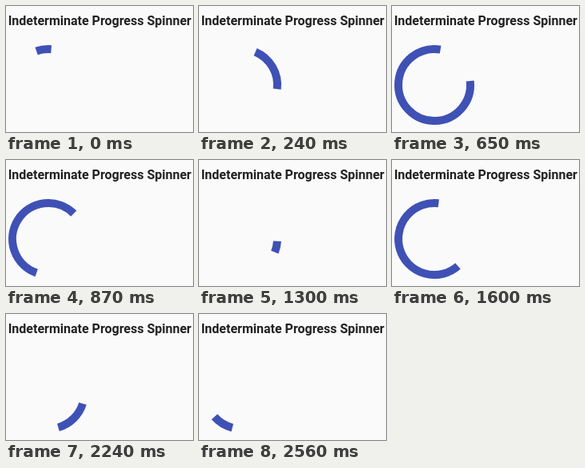
Animation, 234 px wide and 158 px high, one loop 2.58 s. Source, as an HTML page:

```html
<!DOCTYPE html>
<html lang="en">
<head>
<meta charset="utf-8">
<title>Indeterminate Progress Spinner</title>
<style>
  html, body { margin: 0; width: 100%; height: 100%; overflow: hidden; background: #fafafa; }
  svg { display: block; width: 234px; height: 158px; }
  text { font: 700 16px Roboto, sans-serif; fill: #212121; }
  path { fill: none; stroke: #3f51b5; stroke-width: 10; }
</style>
</head>
<body>
<svg viewBox="0 0 234 158">
  <text x="2.7" y="24">Indeterminate Progress Spinner</text>
  <path id="arc"/>
</svg>
<script>
  const LOOP = 2580, STEP = 20;
  const CYCLE = 1188;           // one grow and one shrink
  const FIRST = 107;            // start of the first grow
  const SPIN = 360 / (2 * CYCLE);
  const BASE = -13.4;
  const MIN = 18, MAX = 288;    // arc length in degrees
  const CX = 53, CY = 99, R = 45;
  const arc = document.getElementById('arc');

  // cubic-bezier(.35, 0, .25, 1)
  function ease(x) {
    let lo = 0, hi = 1;
    for (let i = 0; i < 24; i++) {
      const s = (lo + hi) / 2, q = 1 - s;
      const bx = 3 * q * q * s * 0.35 + 3 * q * s * s * 0.25 + s * s * s;
      if (bx < x) lo = s; else hi = s;
    }
    return lo * lo * (3 - 2 * lo);
  }

  function point(deg) {
    const a = deg * Math.PI / 180;
    return (CX + R * Math.sin(a)).toFixed(3) + ' ' + (CY - R * Math.cos(a)).toFixed(3);
  }

  function draw(t) {
    const pos = (t - FIRST) / CYCLE;
    const n = Math.floor(pos);
    const half = (pos - n) * 2;
    let tail = BASE + 270 * n + SPIN * t;
    let head = tail + MAX;
    if (half < 1) head = tail + MIN + (MAX - MIN) * ease(half);
    else tail = head - MAX + (MAX - MIN) * ease(half - 1);
    const large = head - tail > 180 ? 1 : 0;
    arc.setAttribute('d', `M${point(tail)}A${R} ${R} 0 ${large} 1 ${point(head)}`);
  }

  const start = performance.now();
  function tick() {
    const t = (performance.now() - start) % LOOP;
    draw(Math.floor(t / STEP) * STEP);
    requestAnimationFrame(tick);
  }
  draw(0);
  requestAnimationFrame(tick);
</script>
</body>
</html>
```
